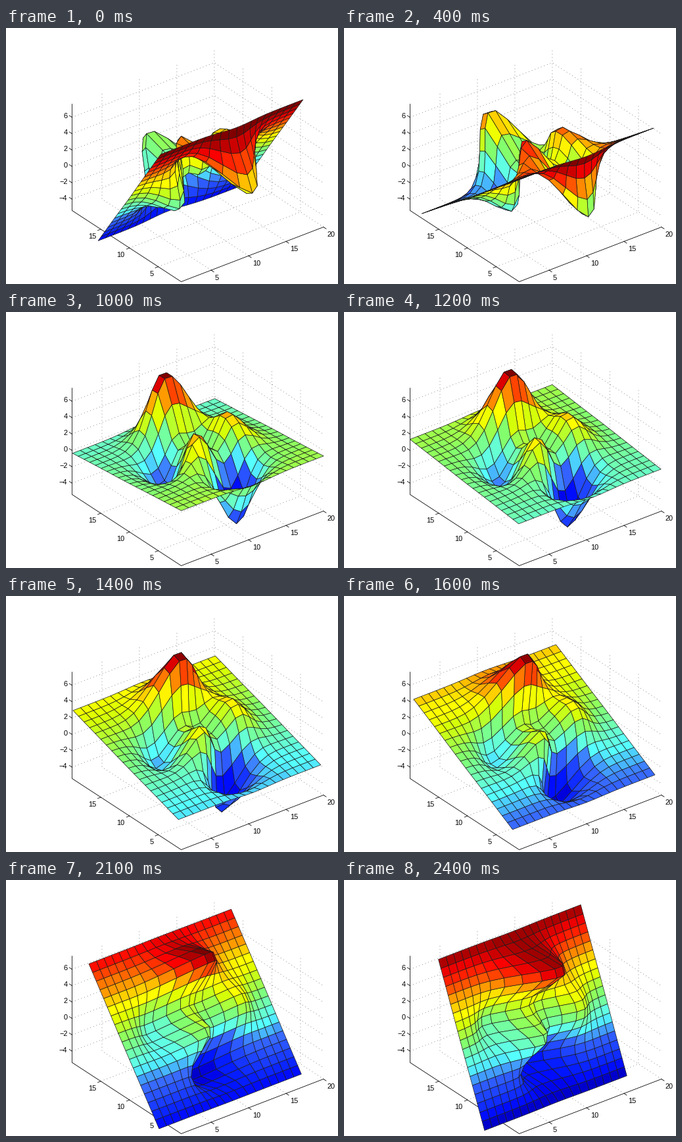
These frames come from a looping animation (505x389 px, 2.5 s). A matplotlib script:

```python
import numpy as np
import matplotlib.pyplot as plt
from matplotlib.animation import FuncAnimation
from matplotlib.collections import PolyCollection

W, H, DPI = 505, 389, 100
PX = 72 / DPI                    # one pixel in points
N, FRAMES = 20, 25
START, STEP = -55, 5             # degrees
ZMIN, ZSPAN = -5.38, 13.0        # vertical axis range
PIVOT_Y, PIVOT_H, PIVOT_Z = 10.5, 6.5, 0.6
AZ, EL, UNIT = np.radians(37.5), np.radians(30), 14.36

# Camera axes: screen right, screen up, towards the viewer
RIGHT = np.array([np.cos(AZ), -np.sin(AZ), 0])
UP = np.array([np.sin(AZ) * np.sin(EL), np.cos(AZ) * np.sin(EL), np.cos(EL)])
NEAR = np.cross(RIGHT, UP)


def project(x, y, h):
    """Screen position; h is the height above the floor."""
    p = np.stack([x - 1, y - 1, h], axis=-1)
    return np.stack([266.5 + UNIT * p @ RIGHT, 385.5 - UNIT * p @ UP], axis=-1)


def peaks(x, y):
    return (3 * (1 - x) ** 2 * np.exp(-x ** 2 - (y + 1) ** 2)
            - 10 * (x / 5 - x ** 3 - y ** 5) * np.exp(-x ** 2 - y ** 2)
            - np.exp(-(x + 1) ** 2 - y ** 2) / 3)


def rainbow(v):
    """Dark blue, cyan, green, yellow, dark red for v from 0 to 1."""
    v = np.floor(v * 63.99) / 63
    red = np.interp(v, [0.06, 0.48, 0.62, 0.87, 1], [0, 0.52, 1, 1, 0.5])
    green = np.interp(v, [0.02, 0.24, 0.33, 0.64, 0.87], [0, 0.42, 1, 1, 0])
    blue = np.interp(v, [0, 0.05, 0.34, 0.58], [0.8, 1, 1, 0])
    return np.stack([red, green, blue], axis=-1)


def quads(a):
    """Four corner values of every mesh cell."""
    cells = np.stack([a[:-1, :-1], a[:-1, 1:], a[1:, 1:], a[1:, :-1]], axis=2)
    return cells.reshape((-1,) + cells.shape[2:])


fig = plt.figure(figsize=(W / DPI, H / DPI), dpi=DPI, facecolor="white")
ax = fig.add_axes([0, 0, 1, 1])
ax.set_xlim(0, W)
ax.set_ylim(H, 0)
ax.axis("off")


def path(*points, **style):
    p = np.array([project(*q) for q in points])
    ax.plot(p[:, 0], p[:, 1], **style)


def grid(*points):
    path(*points, color="0.45", lw=0.8 * PX, zorder=1,
         dashes=(1.2, 5), dash_capstyle="butt")


def tick(point, dx, dy, value, lx, ly, align):
    x, y = project(*point)
    ax.plot([x, x + dx], [y, y + dy], color="black", lw=0.8 * PX, zorder=2)
    ax.text(x + lx, y + ly, str(value).replace("-", "\u2212"), ha=align,
            va="center_baseline", family="Liberation Sans",
            fontsize=11 * PX, zorder=2)


for v in range(5, 21, 5):
    grid((v, 1, 0), (v, 20, 0), (v, 20, ZSPAN))
    tick((v, 1, 0), 4, 2.7, v, 6, 10.5, "left")
for v in range(5, 16, 5):
    grid((1, v, 0), (20, v, 0), (20, v, ZSPAN))
    tick((1, v, 0), -4.5, 1.8, v, -7, 10, "right")
for v in range(-4, 7, 2):
    h = v - ZMIN
    grid((1, 20, h), (20, 20, h), (20, 1, h))
    tick((1, 20, h), -4, -2.7, v, -7, -2.5, "right")
path((1, 20, ZSPAN), (1, 20, 0), (1, 1, 0), (20, 1, 0),
     color="black", lw=0.8 * PX, zorder=2)

steps = np.arange(1.0, N + 1)
X, Y = np.meshgrid(steps, steps)
Z = peaks(*np.meshgrid(np.linspace(-3, 3, N), np.linspace(-3, 3, N)))

surface = PolyCollection([], edgecolors="0.1", linewidths=0.7 * PX,
                         snap=False, zorder=3)
surface.set_joinstyle("round")
ax.add_collection(surface, autolim=False)


def draw(i):
    t = np.radians(START + STEP * i)
    c, s = np.cos(t), np.sin(t)
    dy, dz = Y - PIVOT_Y, Z - PIVOT_Z
    y = PIVOT_Y + dy * c - dz * s
    h = PIVOT_H + dy * s + dz * c
    nearness = quads(np.stack([X, y, h], axis=-1) @ NEAR).mean(axis=1)
    order = np.argsort(nearness)
    level = ((h - h.min()) / np.ptp(h))[:-1, :-1].ravel()
    surface.set_verts(quads(project(X, y, h))[order])
    surface.set_facecolor(rainbow(level[order]))
    return surface,


anim = FuncAnimation(fig, draw, frames=FRAMES, interval=100,
                     repeat=True, repeat_delay=0, blit=False)
plt.show()
```
